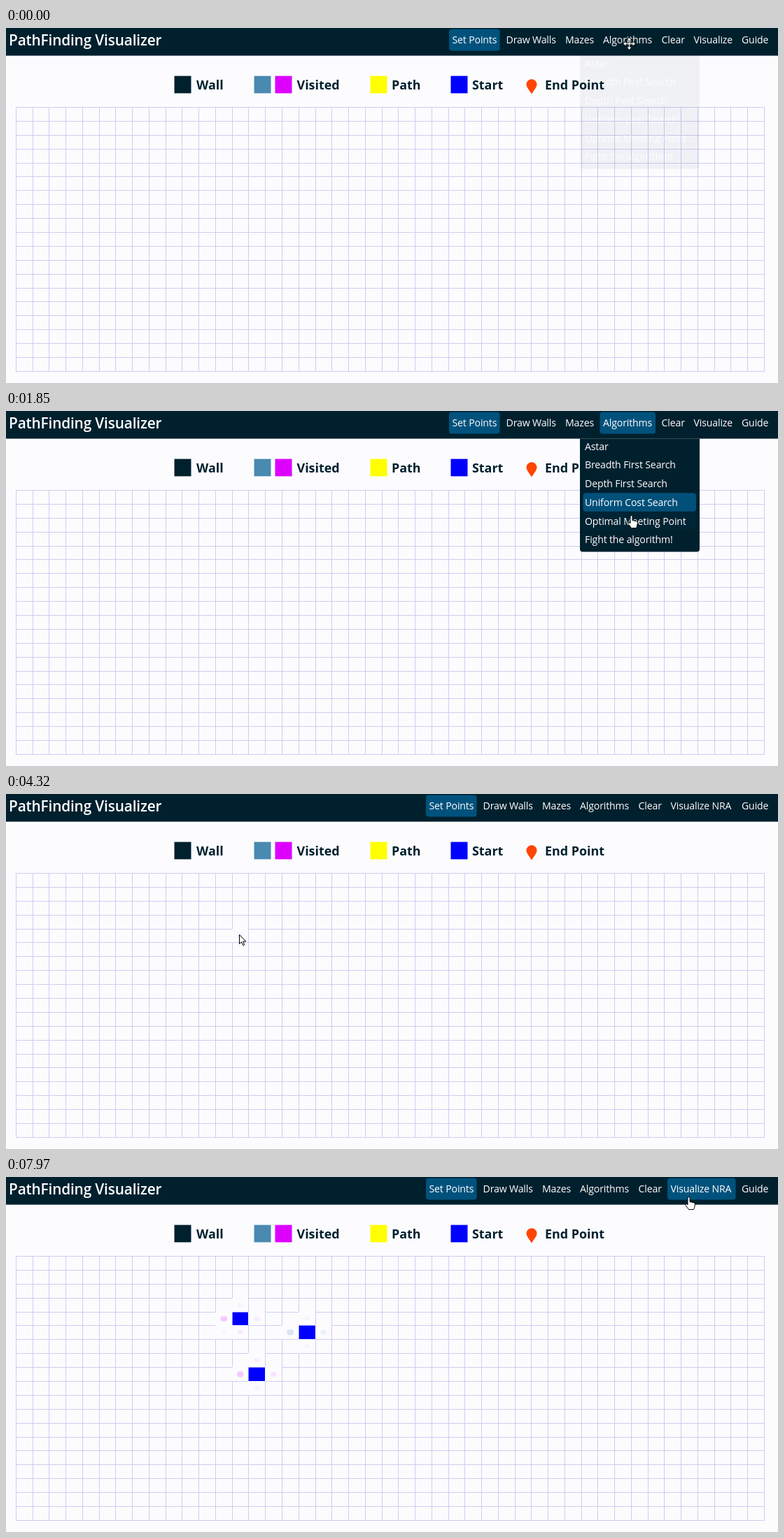
Recreate the animation shown at these times as an HTML page. Size 1103 by 508 pixels, loop 8000 ms.

```html
<!DOCTYPE html>
<html lang="en">
<head>
<meta charset="utf-8">
<title>PathFinding Visualizer</title>
<style>
  html, body { margin: 0; width: 100%; height: 100%; overflow: hidden; background: #fcfcff; }
  svg { display: block; }
  text { font: 14.1px "Open Sans", "Noto Sans", sans-serif; letter-spacing: -.14px; fill: #fff; }
  .title { font-size: 20.8px; font-weight: 600; letter-spacing: -.16px; }
  .legend { font-size: 17.9px; font-weight: 700; letter-spacing: 0; fill: #001f2d; }
</style>
</head>
<body>
<svg id="stage" width="1103" height="508" viewBox="0 0 1103 508"></svg>
<script>
const LOOP = 8000, NAVY = '#00202e', ACTIVE = '#00527d', PAGE = '#fcfcff';
const BLUE = '#0000ff', MAGENTA = '#dd00ff', STEEL = '#4a89b0';
const COLS = 45, ROWS = 19, LEFT = 14.4, TOP = 113, CELL_W = 23.756, CELL_H = 19.89;
const BAR = 39.6, SHIFT = -33, RENAME = 2250;
const stage = document.getElementById('stage');

function el(tag, attrs, parent = stage, label) {
  const node = document.createElementNS('http://www.w3.org/2000/svg', tag);
  for (const key in attrs) node.setAttribute(key, attrs[key]);
  if (label) node.textContent = label;
  return parent.appendChild(node);
}
const box = (x, y, width, height, fill, parent, rx = 0) =>
  el('rect', { x, y, width, height, fill, rx }, parent);
const write = (x, y, label, parent, cls = '') => el('text', { x, y, class: cls }, parent, label);
const colX = c => Math.floor(LEFT + c * CELL_W);
const rowY = r => Math.round(TOP + r * CELL_H);
const clamp = v => Math.max(0, Math.min(1, v));
const show = (node, on) => node.setAttribute('visibility', on ? 'visible' : 'hidden');

// Linear fade in from `start`, fade out from `end`
const fade = (t, start, end, dur, out = dur) =>
  Math.min(clamp((t - start) / dur), 1 - clamp((t - end) / out));

// Grid
let lines = '';
for (let c = 0; c <= COLS; c++) lines += `M${colX(c) + .5} ${TOP}V${rowY(ROWS) + 1}`;
for (let r = 0; r <= ROWS; r++) lines += `M${colX(0)} ${rowY(r) + .5}H${colX(COLS) + 1}`;
el('path', { d: lines, stroke: '#d1cbf1', fill: 'none' });

// Cells that pop in: column, row, time, colour
const cells = [
  [12, 4, 7905, MAGENTA], [13, 5, 7945, MAGENTA], [14, 4, 7945, MAGENTA],
  [13, 3, 7955, MAGENTA], [12, 5, 7960, MAGENTA],
  [16, 5, 7905, STEEL], [18, 5, 7940, STEEL], [17, 4, 7955, STEEL], [17, 6, 7955, STEEL],
  [13, 8, 7905, MAGENTA], [15, 8, 7940, MAGENTA], [14, 7, 7950, MAGENTA], [14, 9, 7958, MAGENTA],
  [13, 4, 4300, BLUE], [14, 8, 5200, BLUE], [17, 5, 6020, BLUE]
].map(([c, r, time, color]) => {
  const x = colX(c), y = rowY(r), w = colX(c + 1) - x, h = rowY(r + 1) - y;
  const g = el('g', {});
  box(x, y, w, h, PAGE, g);
  return { g, time, x: x + .5, y: y + .5, w: w - .5, h: h - .5, fill: box(x, y, w, h, color, g) };
});

function drawCell(cell, t) {
  const p = clamp((t - cell.time) / 400), s = .3 + .7 * p;
  const w = cell.w * s, h = cell.h * s, round = .5 * (1 - p) ** 1.5;
  const set = { x: cell.x + (cell.w - w) / 2, y: cell.y + (cell.h - h) / 2, width: w, height: h,
    rx: w * round, ry: h * round, opacity: Math.min(1, p * 1.2) };
  for (const key in set) cell.fill.setAttribute(key, set[key]);
  show(cell.g, t >= cell.time);
}

// Legend
[[241, NAVY], [355, STEEL], [385, MAGENTA], [521, '#ffff00'], [636, BLUE]]
  .forEach(([x, color]) => box(x - .5, 68.6, 24, 24.8, color));
el('path', { d: 'M751 94.5C748 89.5 743.5 85 743.5 80.5a7.500 7.200 0 0 1 15 0C758.5 85 754 89.5 751 94.5z', fill: '#ff4500' });
[[272, 'Wall'], [415.5, 'Visited'], [551, 'Path'], [666, 'Start'], [770, 'End Point']]
  .forEach(([x, label]) => write(x, 88, label, stage, 'legend'));

// Navigation bar
box(0, 0, 1103, BAR, NAVY);
write(4, 25, 'PathFinding Visualizer', stage, 'title');
const nav = el('g', {});
box(633, 1.5, 72.5, 31, ACTIVE, nav, 4);
const algoBg = box(848.5, 1.5, 79.5, 31, ACTIVE, nav, 4);
const runBg = box(978, 1.5, 97.5, 31, ACTIVE, nav, 4);
const runLabel = [[637.5, 'Set Points'], [714.5, 'Draw Walls'], [799, 'Mazes'],
  [853, 'Algorithms'], [936.5, 'Clear'], [982.5, 'Visualize']]
  .map(([x, label]) => write(x, 22, label, nav)).pop();
write(1051, 22, 'Guide');

// Drop-down menu: label, hover start, hover end
const menu = el('g', {}, nav);
el('path', { d: `M820 ${BAR}H991V197.500a4 4 0 0 1-4 4H824a4 4 0 0 1-4-4z`, fill: NAVY }, menu);
const items = [
  ['Astar', 630, 900], ['Breadth First Search', 880, 1250], ['Depth First Search', 1220, 1510],
  ['Uniform Cost Search', 1490, 1840], ['Optimal Meeting Point', 1830, 2640], ['Fight the algorithm!', LOOP, LOOP]
].map(([label, start, end], i) => {
  const y = 37 + i * 26.75;
  const bg = box(824.5, y, 161.5, 26.5, ACTIVE, menu, 4);
  write(827, y + 18.5, label, menu);
  return { bg, start, end };
});

// Pointers, each with its hot spot at 0,0
const outline = { fill: '#fff', stroke: '#000', 'stroke-linejoin': 'round' };
const arrow = el('path', { ...outline, d: 'M0 0V13l3-2.800 2.200 5 2-.9-2.100-4.800h4.200z' });
const hand = el('path', { ...outline,
  d: 'M-1.500 11V1.500a1.500 1.500 0 0 1 3 0V7l6 1.200q1.800.6 1.500 2.500l-1 5-1 2.300H0l-4.500-6q-1-2 .8-2.200z' });
const move = el('g', { fill: 'none' });
const cross = 'M-7 0H7M0-7V7M-5-2L-7.500 0-5 2M5-2L7.500 0 5 2M-2-5L0-7.500 2-5M-2 5L0 7.500 2 5';
el('path', { d: cross, stroke: '#000', 'stroke-width': 3 }, move);
el('path', { d: cross, stroke: '#fff', 'stroke-width': 1.3 }, move);

// Pointer route: time, x, y
const route = [
  [0, 890, 22], [130, 890, 22], [400, 893, 39], [800, 896, 62], [970, 896, 72], [1500, 895, 117],
  [1850, 893, 149], [2100, 891, 158], [2330, 886, 159], [2450, 785, 158], [2730, 671, 158],
  [3100, 510, 170], [3500, 390, 192], [3860, 333, 201], [4480, 333, 201], [5080, 357, 281],
  [5300, 357, 281], [5580, 412, 248], [5900, 429, 222], [6250, 429, 222], [6840, 640, 148],
  [7300, 850, 72], [7680, 974, 30], [7760, 975, 28], [LOOP, 975, 28]
];
function pointerAt(t) {
  const i = Math.max(1, route.findIndex(k => k[0] > t));
  const [t0, x0, y0] = route[i - 1], [t1, x1, y1] = route[i];
  const p = (t - t0) / (t1 - t0);
  return [Math.round(x0 + (x1 - x0) * p), Math.round(y0 + (y1 - y0) * p)];
}

function render(t) {
  cells.forEach(cell => drawCell(cell, t));

  const renamed = t >= RENAME;
  nav.setAttribute('transform', `translate(${renamed ? SHIFT : 0})`);
  runLabel.textContent = renamed ? 'Visualize NRA' : 'Visualize';
  algoBg.setAttribute('opacity', fade(t, 60, 2640, 850, 760));
  runBg.setAttribute('opacity', fade(t, 7620, LOOP, 300));

  menu.setAttribute('opacity', fade(t, -40, 2420, 960));
  items.forEach(({ bg, start, end }) => bg.setAttribute('opacity', fade(t, start, end, 300)));

  const [x, y] = pointerAt(t);
  const kind = t < 200 ? move : t < 2450 || t >= 7640 ? hand : arrow;
  [arrow, hand, move].forEach(node => show(node, node === kind));
  kind.setAttribute('transform', `translate(${x + .5} ${y + .5})`);
}

const began = performance.now();
function tick() {
  render((performance.now() - began) % LOOP);
  requestAnimationFrame(tick);
}
tick();
</script>
</body>
</html>
```
